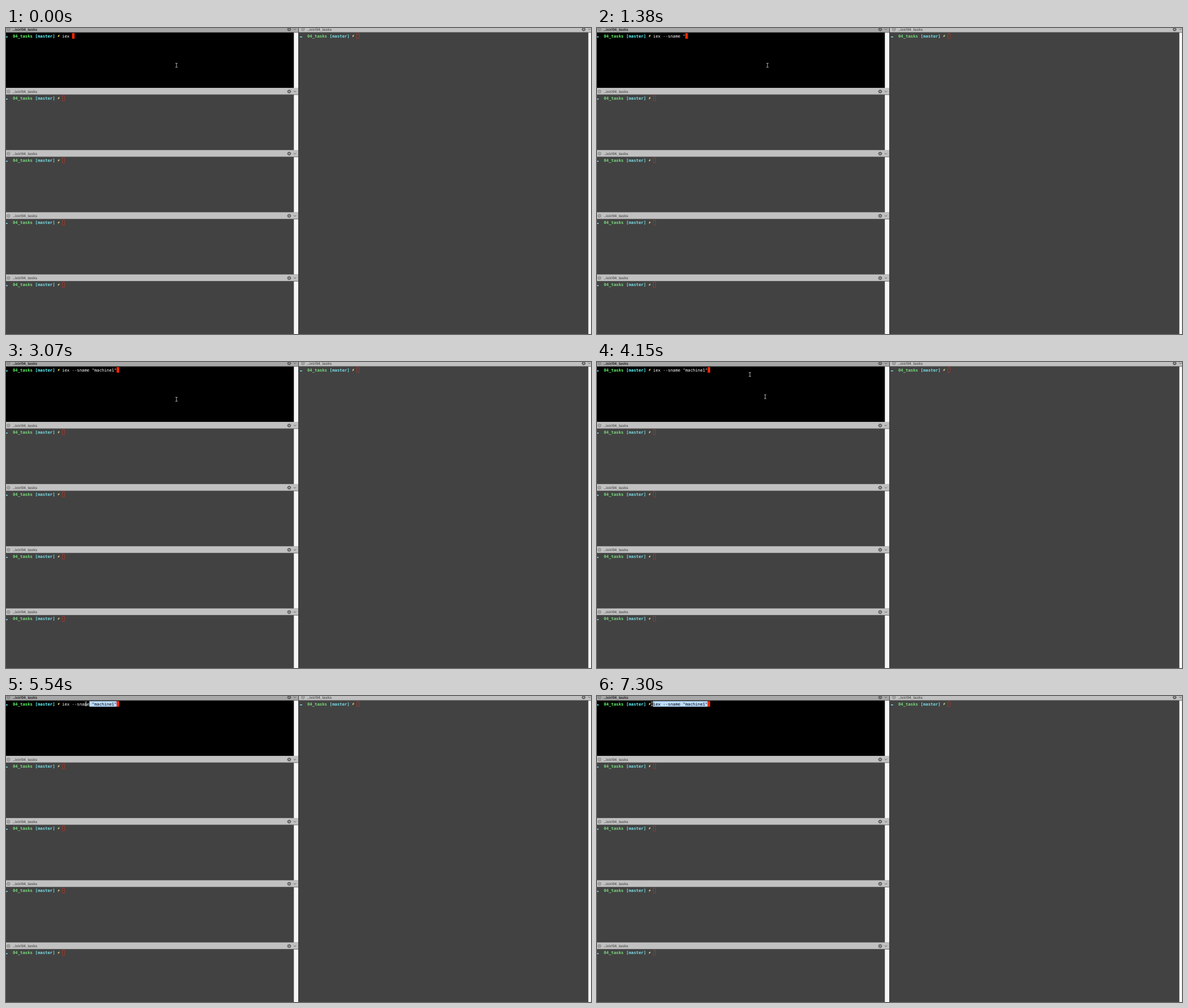
These frames come from a looping animation (1033x542 px, 8000 ms). An HTML page with a canvas:

```html
<!DOCTYPE html>
<html>
<head>
<meta charset="utf-8">
<style>
html, body { margin: 0; width: 100%; height: 100%; overflow: hidden; background: #424242 }
canvas { display: block }
</style>
</head>
<body>
<canvas id="stage" width="1033" height="542"></canvas>
<script>
const ctx = document.getElementById('stage').getContext('2d');
const LOOP = 8000, STEP = 86.2, PITCH = 4.375, TEXT_X = 99.1;
const COMMAND = 'iex --sname "machine1"';
const GLIDE = 4150, DRAG = 5010;

// Typing bursts: first key, last key, characters
const BURSTS = [
  [270, 510, 2], [680, 1030, 5], [1210, 1380, 2], [1740, 2000, 5],
  [2180, 2260, 2], [2620, 3070, 2]
];
// Pointer way points after it starts moving: time, x, y
const PATH = [
  [GLIDE, 270, 22], [4410, 220, 5], [4830, 197, 15], [DRAG, 197, 14],
  [5530, 141, 14], [6250, 97, 14]
];

function rect(x, y, w, h, color) {
  ctx.fillStyle = color;
  ctx.fillRect(x, y, w, h);
}

function line(points, color, width) {
  ctx.strokeStyle = color;
  ctx.lineWidth = width;
  ctx.beginPath();
  points.forEach(([x, y]) => ctx.lineTo(x, y));
  ctx.stroke();
}

function circle(x, y, r, color, width) {
  ctx.strokeStyle = color;
  ctx.lineWidth = width;
  ctx.beginPath();
  ctx.arc(x, y, r, 0, 7);
  ctx.stroke();
}

function mono(str, x, y, color, weight = '') {
  ctx.font = weight + ' 7.27px "DejaVu Sans Mono", monospace';
  ctx.fillStyle = color;
  ctx.fillText(str, x, y);
}

function gear(x, y) {
  circle(x, y, 2, '#505050', 1.5);
  for (let i = 0; i < 8; i++) {
    const c = Math.cos(i * Math.PI / 4), s = Math.sin(i * Math.PI / 4);
    line([[x + c * 2.5, y + s * 2.5], [x + c * 3.7, y + s * 3.7]], '#505050', 1);
  }
}

function header(x, mid, active) {
  circle(x + 4.3, mid, 2.7, '#666', .8);
  for (const d of [-1.1, 1.1])
    line([[x + 4.3 - d, mid - 1.1], [x + 4.3 + d, mid + 1.1]], '#666', .7);
  ctx.font = 'bold 6.6px "Liberation Sans", Arial, sans-serif';
  ctx.fillStyle = active ? '#222' : '#5c5c5c';
  ctx.fillText('..ixir/04_tasks', x + 12, mid + 2.3);
  gear(x + 500, mid);
  line([[x + 508, mid - 1], [x + 510, mid + 1], [x + 512, mid - 1]], '#555', .9);
}

function prompt(x, y, active) {
  const cyan = active ? '#60fdff' : '#78dce4';
  rect(x - 1, y + 1, 4, 1.5, cyan);
  mono('04_tasks', x + 12, y + 2.5, active ? '#5ffa68' : '#78dc7d', 'bold');
  mono('[master]', x + 51.6, y + 2.5, cyan, 'bold');
  ctx.fillStyle = active ? '#fff36a' : '#dcd98a';
  ctx.beginPath();
  [[94.6, -2.8], [91, .6], [92.6, .6], [91.4, 3], [95, -.5], [93.4, -.5]]
    .forEach(([px, py]) => ctx.lineTo(x + px, y + py));
  ctx.fill();
  if (active) return;
  ctx.strokeStyle = '#a8372b';
  ctx.lineWidth = .8;
  ctx.strokeRect(x + 99.5, y - 4.3, 4, 9);
}

// origin is where the pane's contents start
function pane(x, y, w, h, origin, active) {
  rect(x, y, w, h, active ? '#000' : '#424242');
  rect(origin + 508.3, y, x + w - origin - 508.3, h, '#f6f6f6');
  rect(x, y, w, 12, active ? '#a8a8a8' : '#c1c1c1');
  rect(x, y + 11.6, w, .8, '#555');
  header(origin, y + 6.4, active);
  prompt(origin, y + 18.1, active);
}

function beam([x, y]) {
  const color = '#c8c8c8';
  line([[x, y - 3.5], [x, y + 3.5]], color, .9);
  for (const end of [-3.7, 3.7])
    line([[x - 2, y + end], [x, y + end * .88], [x + 2, y + end]], color, .8);
}

function pointer(t) {
  if (t < GLIDE) return [301, 66];
  const i = PATH.findIndex(p => p[0] > t);
  if (i < 0) return PATH.at(-1).slice(1);
  const [t0, x0, y0] = PATH[i - 1], [t1, x1, y1] = PATH[i];
  const u = (t - t0) / (t1 - t0);
  return [x0 + (x1 - x0) * u, y0 + (y1 - y0) * u];
}

function typedCount(t) {
  return BURSTS.reduce((sum, [first, last, n]) => t < first ? sum :
    sum + Math.min(n, 1 + Math.floor((t - first) / (last - first) * (n - 1))), 4);
}

function command(t, moment) {
  const typed = typedCount(t), text = COMMAND.slice(0, typed);
  const end = TEXT_X + typed * PITCH;
  mono(text, TEXT_X, 16.6, '#fff');
  rect(end, 9.1, 4.4, 9.8, '#ff2600');
  if (t < DRAG) return;
  // The highlight trails the pointer by one step
  const [x] = pointer(moment - STEP);
  const from = Math.max(0, Math.floor((x - TEXT_X) / PITCH));
  const left = TEXT_X + from * PITCH;
  rect(left, 9.1, Math.max(0, end - left), 9.8, '#badcff');
  mono(text.slice(from), left, 16.6, '#000');
}

function draw(t) {
  ctx.textRendering = 'geometricPrecision';
  rect(0, 0, 1033, 542, '#424242');
  for (let i = 0; i < 5; i++)
    pane(0, -4.1 + i * 110.15, 516, 110.15, 0, i === 0);
  pane(517, -4.1, 516, 546.1, 520, false);

  const moment = GLIDE + Math.floor((t - GLIDE) / STEP) * STEP;
  command(t, moment);
  beam(pointer(moment));
  // The first jump leaves a brief trace behind
  if (moment === GLIDE) beam([297, 61.5]);
}

const start = performance.now();
function tick() {
  draw((performance.now() - start) % LOOP);
  requestAnimationFrame(tick);
}
tick();
</script>
</body>
</html>
```
